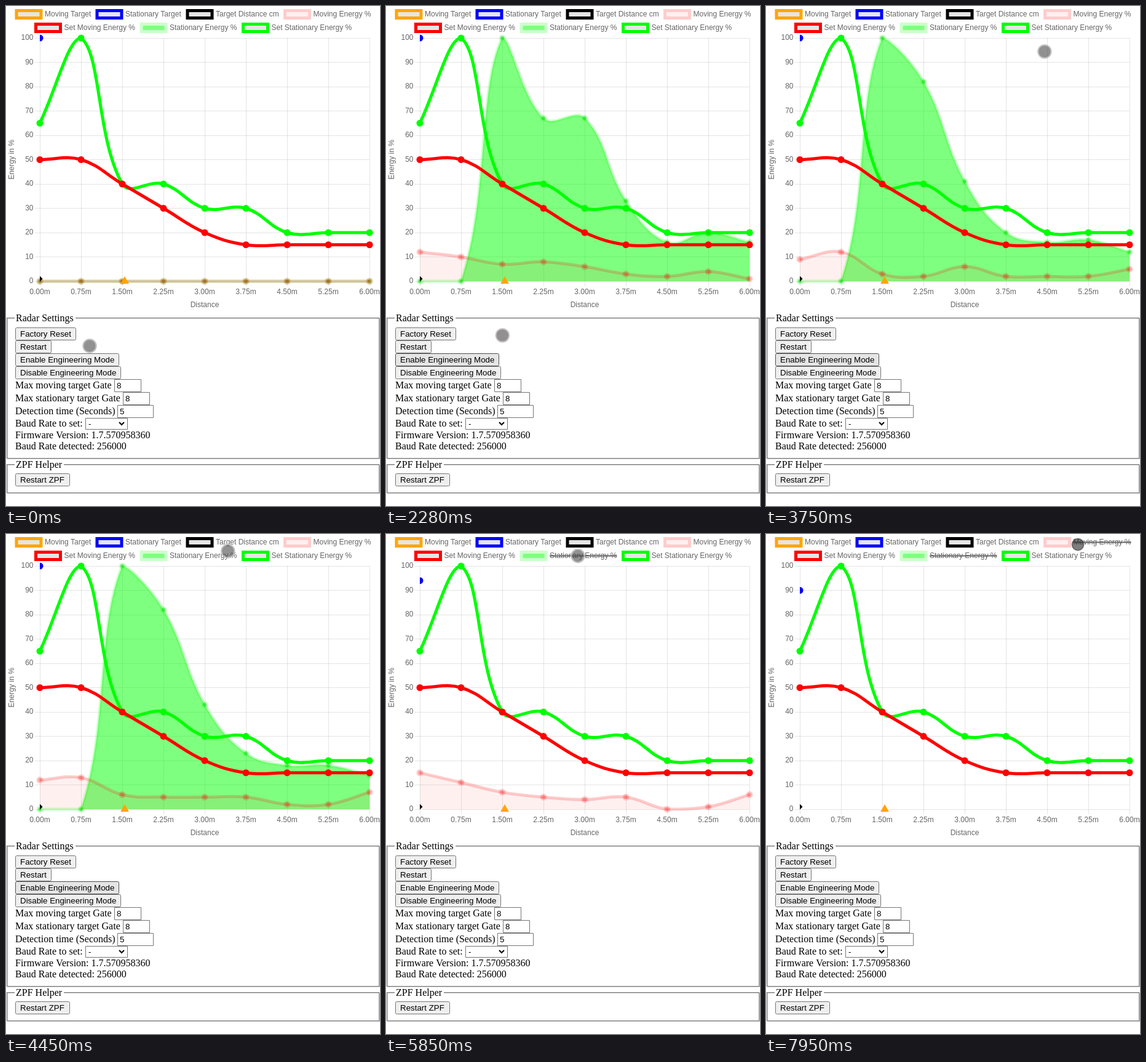
Write an HTML page with a canvas that moves like this. It is 608 px wide and 812 px high and loops after 8000 ms.

```html
<!DOCTYPE html>
<html lang="en">
<head>
<meta charset="utf-8">
<title>Radar Settings</title>
<style>
html, body { margin: 0; width: 100%; height: 100%; overflow: hidden; background: #fff; }
canvas { display: block; width: 608px; height: 812px; }
</style>
</head>
<body>
<canvas id="stage" width="608" height="812"></canvas>
<script>
const ctx = document.getElementById('stage').getContext('2d');
const SANS = '"Liberation Sans", Arial, sans-serif';
const SERIF = '"Liberation Serif", "Times New Roman", serif';
const LOOP = 8000, STEP = 70, TAU = Math.PI * 2;
const ENABLE = 960, GREEN_END = 1600, HIDE_STILL = 5020, HIDE_MOVING = 7750;
const LEFT = 55, TOP = 52, RIGHT = 591, BOTTOM = 447;

const setMoving = [50, 50, 40, 30, 20, 15, 15, 15, 15];
const setStill = [65, 100, 40, 40, 30, 30, 20, 20, 20];
const zero = Array(9).fill(0);

// Measured energies per gate; peak is the stationary target value
const keys = [
  { t: 1300, moving: [13, 11, 10, 4, 5, 3, 4, 1, 4], still: [0, 0, 100, 100, 76, 40, 23, 23, 20], peak: 100 },
  { t: 2280, moving: [12, 10, 7, 8, 6, 3, 2, 4, 1], still: [0, 0, 100, 67, 67, 33, 16, 20, 16], peak: 100 },
  { t: 3750, moving: [9, 12, 3, 2, 6, 2, 2, 2, 5], still: [0, 0, 100, 82, 41, 20, 16, 17, 12], peak: 100 },
  { t: 5090, moving: [14, 12, 6, 7, 2, 5, 1, 1, 7], still: zero, peak: 100 },
  { t: 6550, moving: [13, 12, 10, 5, 5, 5, 1, 2, 6], still: zero, peak: 88 },
  { t: 7950, moving: [13, 12, 10, 5, 5, 5, 1, 2, 6], still: zero, peak: 90 }
];
keys[3].still = keys[2].still;

const cursorPath = [
  [60, 136, 552], [340, 136, 573], [1720, 135, 573], [1860, 141, 570], [2280, 189, 535],
  [2500, 262, 503], [2630, 290, 480], [3000, 348, 330], [3300, 395, 190], [3600, 453, 74],
  [3750, 453, 74], [4240, 400, 25], [4310, 385, 24], [4800, 301, 37], [5780, 301, 37],
  [6400, 397, 24], [6690, 397, 24], [7300, 507, 15], [7540, 507, 17]
];
const presses = [[740, 1720], [4950, 5450], [6480, 6690], [7600, 8000]];

const lerp = (a, b, p) => a + (b - a) * p;
const clamp = (v, lo, hi) => Math.min(hi, Math.max(lo, v));
const noise = n => { const s = Math.sin(n * 12.9898) * 43758.5453; return (s - Math.floor(s)) * 2 - 1; };
const gateX = i => LEFT + i * 67;
const valueY = v => BOTTOM - v * 3.95;

function text(str, x, y, font, color = '#000', align = 'left', base = 'alphabetic') {
  ctx.font = font;
  ctx.fillStyle = color;
  ctx.textAlign = align;
  ctx.textBaseline = base;
  ctx.fillText(str, x, y);
}

function label(str, x, y, align = 'center') {
  text(str, x, y, '12px ' + SANS, '#666', align, 'middle');
}

function rule(x1, y1, x2, y2, color, width = 1) {
  ctx.strokeStyle = color;
  ctx.lineWidth = width;
  ctx.beginPath();
  ctx.moveTo(x1, y1);
  ctx.lineTo(x2, y2);
  ctx.stroke();
}

function polygon(points, fill, stroke) {
  ctx.beginPath();
  points.forEach(([x, y]) => ctx.lineTo(x, y));
  ctx.closePath();
  ctx.fillStyle = fill;
  ctx.fill();
  if (stroke) {
    ctx.strokeStyle = fill;
    ctx.lineWidth = stroke;
    ctx.stroke();
  }
}

// Live readings at time t, refreshed once per step
function readings(t) {
  if (t < ENABLE) return { moving: zero, still: zero, peak: 100 };
  if (t > 4870 && t < HIDE_STILL) t = 4870;
  let i = 0;
  while (i < keys.length - 2 && t >= keys[i + 1].t) i++;
  const a = keys[i], b = keys[i + 1];
  const k = Math.floor((t - a.t) / STEP);
  const p = t >= b.t ? 1 : clamp(k * STEP / (b.t - a.t), 0, 1);
  const wobble = p === 1 || k === 0 ? 0 : 1;
  const seed = Math.floor(t / 1400) + (i * 40 + k) * 31;
  const mix = (name, amp) => a[name].map((v, g) => {
    const to = b[name][g];
    if (v === to && (v === 0 || v === 100)) return v;
    return clamp(Math.round(lerp(v, to, p) + wobble * amp * noise(seed + g)), 0, 100);
  });
  return { moving: mix('moving', 1.6), still: mix('still', 4), peak: Math.round(lerp(a.peak, b.peak, p)) };
}

// Cardinal spline, control points kept inside the plot
function curve(values) {
  const pts = values.map((v, i) => [gateX(i), valueY(v)]);
  const handles = pts.map((p, i) => {
    const a = pts[Math.max(0, i - 1)], b = pts[Math.min(pts.length - 1, i + 1)];
    const d1 = Math.hypot(p[0] - a[0], p[1] - a[1]);
    const d2 = Math.hypot(b[0] - p[0], b[1] - p[1]);
    const at = f => [
      clamp(p[0] + f * (b[0] - a[0]), LEFT, RIGHT),
      clamp(p[1] + f * (b[1] - a[1]), TOP, BOTTOM)
    ];
    return [at(-0.4 * d1 / (d1 + d2)), at(0.4 * d2 / (d1 + d2))];
  });
  const path = new Path2D();
  path.moveTo(...pts[0]);
  for (let i = 1; i < pts.length; i++) path.bezierCurveTo(...handles[i - 1][1], ...handles[i][0], ...pts[i]);
  return { path, pts };
}

function series(values, line, fill, dot) {
  const { path, pts } = curve(values);
  if (fill) {
    const area = new Path2D(path);
    area.lineTo(RIGHT, BOTTOM);
    area.lineTo(LEFT, BOTTOM);
    ctx.fillStyle = fill;
    ctx.fill(area);
  }
  ctx.strokeStyle = line;
  ctx.lineWidth = 5;
  ctx.stroke(path);
  for (const [x, y] of pts) {
    ctx.beginPath();
    ctx.arc(x, y, 3, 0, TAU);
    ctx.fillStyle = dot || line;
    ctx.fill();
    ctx.stroke();
  }
}

function legend(t) {
  const item = (x, y, name, line, fill = '#e5e5e5', struck = false) => {
    ctx.fillStyle = fill;
    ctx.fillRect(x, y - 6, 40, 12);
    ctx.strokeStyle = line;
    ctx.lineWidth = 5;
    ctx.strokeRect(x, y - 6, 40, 12);
    label(name, x + 46, y, 'left');
    if (struck) rule(x + 46, y, x + 46 + ctx.measureText(name).width, y, '#666', 2);
  };
  item(17, 13.5, 'Moving Target', '#ffa500');
  item(148, 13.5, 'Stationary Target', '#00f');
  item(295, 13.5, 'Target Distance cm', '#000');
  item(453.5, 13.5, 'Moving Energy %', '#fcc', '#fef0f0', t >= HIDE_MOVING);
  item(48.5, 35.5, 'Set Moving Energy %', '#f00');
  item(220, 35.5, 'Stationary Energy %', '#ccffcc', '#80ff80', t >= HIDE_STILL);
  item(385.5, 35.5, 'Set Stationary Energy %', '#0f0');
}

function axes() {
  const grid = 'rgba(0,0,0,0.1)';
  for (let i = 0; i < 9; i++) {
    const x = gateX(i);
    rule(x + 0.5, TOP, x + 0.5, BOTTOM + 8, grid);
    label((i * 0.75).toFixed(2) + 'm', x, 464.5);
  }
  for (let v = 0; v <= 100; v += 10) {
    const y = valueY(v);
    rule(LEFT - 8, Math.floor(y) + 0.5, RIGHT, Math.floor(y) + 0.5, grid);
    label(v, 44.5, y, 'right');
  }
  label('Distance', 323, 486);
  ctx.save();
  ctx.translate(9.5, 249.5);
  ctx.rotate(-Math.PI / 2);
  label('Energy in %', 0, 0);
  ctx.restore();
}

function chart(t) {
  const now = readings(t);
  legend(t);
  axes();
  series(setStill, '#0f0');
  if (t < HIDE_STILL) series(now.still, 'rgba(0,255,0,0.2)', 'rgba(0,255,0,0.5)');
  if (t < HIDE_STILL) {
    ctx.fillStyle = 'rgba(0,200,0,0.35)';
    now.still.forEach((v, i) => {
      ctx.beginPath();
      ctx.arc(gateX(i), valueY(v), 3, 0, TAU);
      ctx.fill();
    });
  }
  series(setMoving, '#f00');
  if (t < HIDE_MOVING) series(now.moving, 'rgba(255,0,0,0.2)', 'rgba(255,0,0,0.06)');

  polygon([[55, 438.5], [59.5, 443], [55, 447.5]], '#000');
  ctx.fillStyle = '#00f';
  ctx.beginPath();
  ctx.arc(LEFT, valueY(now.peak), 5.5, -Math.PI / 2, Math.PI / 2);
  ctx.fill();
  polygon([[193, 444], [195.6, 448.5], [190.4, 448.5]], '#ffa500', 5);
}

function box(x, y, w, h, fill, border, radius) {
  ctx.beginPath();
  ctx.roundRect(x + 0.5, y + 0.5, w - 1, h - 1, radius);
  ctx.fillStyle = fill;
  ctx.fill();
  ctx.strokeStyle = border;
  ctx.lineWidth = 1;
  ctx.stroke();
}

function button(str, y, w, state) {
  if (state === 'done') {
    ctx.fillStyle = '#000';
    ctx.fillRect(15, y, w, 21);
    ctx.fillStyle = '#008000';
    ctx.fillRect(17, y + 2, w - 4, 17);
  } else {
    const hover = state === 'hover';
    box(15, y, w, 21, hover ? '#e5e5e5' : '#efefef', hover ? '#4f4f4f' : '#767676', 2);
  }
  text(str, 23, y + 15, '13.333px ' + SANS);
}

function field(str, x, y, w) {
  box(x, y, w, 21, '#fff', '#767676', 0);
  text(str, x + 4, y + 15, '13.333px ' + SANS);
}

function fieldset(str, y, h, gap) {
  ctx.lineWidth = 1;
  ctx.strokeStyle = '#c0c0c0';
  ctx.strokeRect(2.5, y + 1.5, 605, h - 2);
  ctx.strokeStyle = '#808080';
  ctx.strokeRect(1.5, y + 0.5, 605, h - 2);
  ctx.fillStyle = '#fff';
  ctx.fillRect(14, y - 1, gap, 4);
  text(str, 16, y + 6, '16px ' + SERIF);
}

function form(t) {
  const serif = (str, y) => text(str, 15, y, '16px ' + SERIF);
  fieldset('Radar Settings', 506, 230, 99);
  button('Factory Reset', 522, 99);
  button('Restart', 543, 59);
  const state = t < ENABLE || t >= HIDE_STILL ? '' : t < GREEN_END ? 'done' : 'hover';
  button('Enable Engineering Mode', 564, 169, state);
  button('Disable Engineering Mode', 585, 172);
  serif('Max moving target Gate', 621);
  field('8', 176, 606, 44);
  serif('Max stationary target Gate', 642);
  field('8', 190, 627, 44);
  serif('Detection time (Seconds)', 663);
  field('5', 181, 648, 59);
  serif('Baud Rate to set:', 683);
  box(129, 669, 69, 19, '#fff', '#767676', 0);
  text('-', 134, 683, '13.333px ' + SANS);
  ctx.strokeStyle = '#000';
  ctx.lineWidth = 2;
  ctx.beginPath();
  ctx.moveTo(184, 676);
  ctx.lineTo(188, 680);
  ctx.lineTo(192, 676);
  ctx.stroke();
  serif('Firmware Version: 1.7.570958360', 702);
  serif('Baud Rate detected: 256000', 720);
  fieldset('ZPF Helper', 744, 48, 80);
  button('Restart ZPF', 759, 89);
}

function cursor(t) {
  let i = 0;
  while (i < cursorPath.length - 2 && t >= cursorPath[i + 1][0]) i++;
  const [t0, x0, y0] = cursorPath[i], [t1, x1, y1] = cursorPath[i + 1];
  const p = clamp((t - t0) / (t1 - t0), 0, 1);
  const x = lerp(x0, x1, p), y = lerp(y0, y1, p);
  const pressed = presses.some(([from, to]) => t >= from && t < to);
  ctx.beginPath();
  ctx.arc(x, y, 10, 0, TAU);
  ctx.fillStyle = pressed ? 'rgba(40,40,40,0.6)' : 'rgba(72,72,72,0.6)';
  ctx.fill();
  ctx.beginPath();
  ctx.arc(x, y, pressed ? 9.5 : 10.7, 0, TAU);
  ctx.strokeStyle = pressed ? 'rgba(60,60,60,0.4)' : 'rgba(190,185,185,0.9)';
  ctx.lineWidth = 2;
  ctx.stroke();
}

const start = performance.now();
function frame() {
  const t = (performance.now() - start) % LOOP;
  ctx.fillStyle = '#fff';
  ctx.fillRect(0, 0, 608, 812);
  chart(t);
  form(t);
  cursor(t);
  requestAnimationFrame(frame);
}
frame();
</script>
</body>
</html>
```
